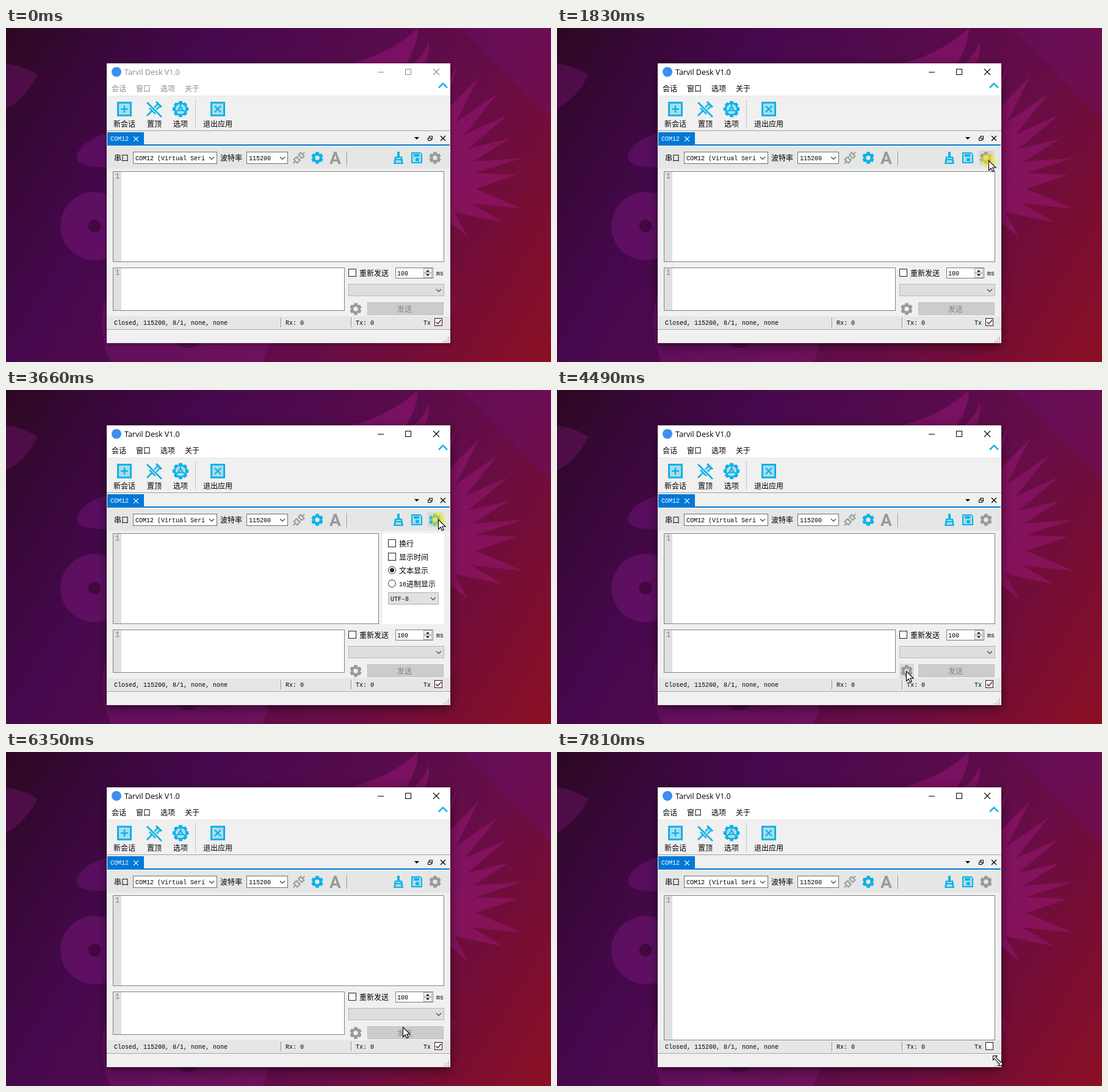
These frames come from a looping animation (893x548 px, 8 s). An HTML page with a canvas:

```html
<!DOCTYPE html>
<html lang="zh">
<head>
<meta charset="utf-8">
<title>Serial session</title>
<style>
html, body { margin: 0; width: 100%; height: 100%; overflow: hidden; background: #44094a; }
canvas { display: block; width: 893px; height: 548px; }
</style>
</head>
<body>
<canvas id="stage" width="893" height="548"></canvas>
<script>
const c = document.getElementById('stage').getContext('2d');
const LOOP = 8000;
const BLUE = '#0bb2e8', PALE = '#a9dcea', GRAY = '#999', FACE = '#f0f0f0', BAR = '#e4e7e6';
const CJK = '12px "Noto Sans CJK SC", "Noto Sans CJK JP", sans-serif';
const MONO = '10px "Liberation Mono", "DejaVu Sans Mono", monospace';

// start, end, steps, x, y, ease power
const MOVES = [
  [260, 530, 5, 842, 409, 1],
  [730, 1500, 12, 709, 221, 1.25],
  [1560, 1630, 2, 707, 217, 1],
  [2160, 2510, 6, 708, 268, 0.613],
  [2580, 2930, 6, 708, 212, 1.3],
  [3930, 4350, 7, 573, 464, 1.2],
  [4490, 4630, 3, 571, 454, 1],
  [5320, 5330, 1, 570, 460, 1],
  [5390, 5530, 3, 538, 457, 1],
  [5600, 5800, 4, 575, 447, 1.2],
  [6080, 6350, 5, 650, 451, 1],
  [6420, 6700, 5, 728, 461, 1.2],
  [6770, 7190, 7, 708, 484, 1.4],
  [7600, 7810, 4, 722, 506, 1.2]
];
const CLICKS = [[1830, 1960], [3660, 3730], [4770, 4900], [5940, 6010], [7390, 7460]];
const within = (t, a, b) => t >= a && t < b;

function pointer(t) {
  let x = 862, y = 533;
  for (const [a, b, n, tx, ty, e] of MOVES) {
    if (t < a) break;
    const k = Math.floor(Math.min(1, (t - a) / (b - a)) * (n - 1)) + 1;
    const p = 1 - Math.pow(1 - k / n, e);
    x += (tx - x) * p;
    y += (ty - y) * p;
  }
  return { x: Math.round(x), y: Math.round(y) };
}

function rect(x, y, w, h, fill) {
  c.fillStyle = fill;
  c.fillRect(x, y, w, h);
}
function box(x, y, w, h, fill, edge) {
  rect(x, y, w, h, edge);
  rect(x + 1, y + 1, w - 2, h - 2, fill);
}
function line(pts, color, width = 1) {
  c.beginPath();
  for (let i = 0; i < pts.length; i += 2) c.lineTo(pts[i], pts[i + 1]);
  c.strokeStyle = color;
  c.lineWidth = width;
  c.stroke();
}
function poly(pts, fill) {
  c.beginPath();
  for (let i = 0; i < pts.length; i += 2) c.lineTo(pts[i], pts[i + 1]);
  c.closePath();
  c.fillStyle = fill;
  c.fill();
}
function disc(x, y, r, fill) {
  c.beginPath();
  c.arc(x, y, r, 0, 7);
  c.fillStyle = fill;
  c.fill();
}
function curve(d, fill) {
  c.fillStyle = fill;
  c.fill(new Path2D(d));
}
function text(s, x, y, font, color = '#000', drop = 4) {
  c.font = font;
  c.fillStyle = color;
  c.fillText(s, x, y + drop);
}
const han = (s, x, y, color) => text(s, x, y, CJK, color, 4.5);
const mono = (s, x, y, color) => text(s, x, y, MONO, color, 3.5);
const cross = (x, y, r, color, w = 1.1) => {
  line([x - r, y - r, x + r, y + r], color, w);
  line([x - r, y + r, x + r, y - r], color, w);
};
const chevron = (x, y, color = '#444') => line([x - 4, y - 2, x, y + 2, x + 4, y - 2], color, 1.2);

function gear(x, y, color, n = 6, r = 10, inner = 7.6, hole = 3.7) {
  c.beginPath();
  for (let i = 0; i < n; i++) {
    const a = i * 2 * Math.PI / n - Math.PI / 2, w = Math.PI / n;
    for (const [d, q] of [[-0.85, inner], [-0.48, r], [0.48, r], [0.85, inner]])
      c.lineTo(x + q * Math.cos(a + d * w), y + q * Math.sin(a + d * w));
  }
  c.closePath();
  c.moveTo(x + hole, y);
  c.arc(x, y, hole, 0, 2 * Math.PI);
  c.fillStyle = color;
  c.fill('evenodd');
}
function check(x, y, on, edge = '#222') {
  box(x, y, 13, 13, '#fff', edge);
  if (on) line([x + 2.5, y + 6.5, x + 5.5, y + 9.5, x + 11, y + 3], '#4a1235', 1.3);
}
function radio(x, y, on) {
  disc(x, y, 6.5, '#333');
  disc(x, y, 5.5, '#fff');
  if (on) disc(x, y, 3.5, '#222');
}
function combo(x, y, w, label, fill = '#fff', edge = '#707070') {
  box(x, y, w, 20, fill, edge);
  mono(label, x + 4, y + 10);
  chevron(x + w - 9, y + 10.5);
}

function wallpaper() {
  const g = c.createLinearGradient(0, 0, 893, 548);
  [[0, '#2c0821'], [0.14, '#39083a'], [0.28, '#46084d'], [0.5, '#560b4c'],
   [0.7, '#680d46'], [0.85, '#780d32'], [1, '#8c1024']].forEach(s => g.addColorStop(...s));
  rect(0, 0, 893, 548, g);
  poly([745, 0, 893, 0, 893, 150], 'rgba(110,18,115,.3)');
  curve('M0 58Q28 62 52 77Q30 118 0 132Z', 'rgba(120,22,115,.4)');
  curve('M165 173C130 182 112 204 117 216C122 227 145 228 165 229Z', 'rgba(125,20,135,.4)');
  disc(145, 325, 56, 'rgba(130,26,130,.42)');
  disc(145, 325, 10.5, '#42083f');
  disc(296, 485, 139, 'rgba(130,26,120,.36)');
  disc(298, 500, 25, '#4a0b48');
  const pink = 'rgba(165,25,130,.42)';
  curve('M565 58Q630 42 675 0Q676 24 656 58Z', pink);
  curve('M668 58Q690 38 692 20Q696 40 686 58Z', pink);
  const tips = [740, 58, 775, 80, 806, 107, 822, 143, 824, 182, 847, 213, 837, 241, 848, 297, 815, 319, 757, 343];
  const fan = [650, 255];
  for (let i = 0; i < tips.length; i += 2) {
    fan.push(tips[i], tips[i + 1]);
    if (i + 3 < tips.length) {
      const mx = (tips[i] + tips[i + 2]) / 2, my = (tips[i + 1] + tips[i + 3]) / 2;
      fan.push(mx + (650 - mx) * 0.38, my + (255 - my) * 0.38);
    }
  }
  poly(fan, pink);
  poly([728, 428, 737, 445, 728, 474], 'rgba(150,20,90,.4)');
}

function frameAndBars(active) {
  const ink = active ? '#000' : '#8c8c8c';
  c.save();
  c.shadowColor = active ? 'rgba(0,0,0,.55)' : 'rgba(0,0,0,.35)';
  c.shadowBlur = active ? 16 : 8;
  c.shadowOffsetY = active ? 4 : 1;
  rect(165, 58, 563, 459, FACE);
  c.restore();
  rect(165, 58, 563, 53, '#fff');
  disc(181, 72, 8, '#3d8ef0');
  text('Tarvil Desk V1.0', 194, 72, '12.5px "Open Sans", "Noto Sans", sans-serif', ink, 4.7);
  rect(609, 72, 10, 1, ink);
  c.strokeStyle = ink;
  c.lineWidth = 1;
  c.strokeRect(654.5, 67.5, 9, 9);
  cross(705, 72, 5, ink);
  ['会话', '窗口', '选项', '关于'].forEach((s, i) => han(s, 173 + i * 40, 99, ink));
  line([709, 98, 716, 91, 723, 98], '#19b4e8', 2.6);
  rect(165, 111, 563, 1, '#e6e6e6');
}

function toolbar() {
  for (const x of [182, 335]) {
    rect(x, 121, 24, 24, BLUE);
    rect(x + 3, 124, 18, 18, PALE);
  }
  line([188, 133, 200, 133], BLUE, 2.4);
  line([194, 127, 194, 139], BLUE, 2.4);
  cross(347, 133, 5, BLUE, 2.4);
  line([231, 144, 239, 136], BLUE, 2.6);
  line([235, 131, 245, 141], BLUE, 3);
  poly([239, 133, 248, 123, 253, 128, 243, 138], PALE);
  line([239, 134, 249, 124], BLUE, 2);
  line([243, 138, 253, 128], BLUE, 2);
  line([246, 121, 255, 130], BLUE, 3);
  line([231, 122, 255, 146], FACE, 5);
  line([231, 122, 255, 146], BLUE, 2.6);
  gear(286, 133, BLUE, 8, 13.4, 10.8, 8);
  disc(286, 133, 8, PALE);
  for (let i = 0; i < 3; i++) {
    const a = Math.PI * (0.5 + i * 2 / 3);
    line([286, 133, 286 - 9 * Math.cos(a), 133 - 9 * Math.sin(a)], BLUE, 2.4);
  }
  disc(286, 133, 3.6, BLUE);
  disc(286, 133, 1.5, PALE);
  han('新会话', 176, 157);
  han('置顶', 231, 157);
  han('选项', 274, 157);
  han('退出应用', 323, 157);
  rect(310, 117, 1, 47, '#c6c6c6');
  rect(165, 168, 563, 1, '#a0a0a0');

  rect(166, 171, 60, 22, '#0078d7');
  rect(166, 191, 561, 2, '#0078d7');
  mono('COM12', 171, 181, '#fff');
  cross(213, 182, 3.8, '#fff', 1.2);
  poly([669, 179, 677, 179, 673, 183], '#000');
  c.strokeStyle = '#000';
  c.lineWidth = 1;
  c.strokeRect(693.5, 177.5, 5, 5);
  box(691, 180, 6, 5, FACE, '#000');
  cross(716, 181, 4, '#000', 1.3);
}

function sessionBar(p1, hover) {
  rect(166, 195, 561, 36, BAR);
  han('串口', 177, 213);
  combo(208, 203, 138, 'COM12 (Virtual Seri');
  han('波特率', 351, 213);
  combo(394, 203, 68, '115200');
  c.save();
  c.translate(480, 213);
  c.rotate(-Math.PI / 4);
  line([-13, 0, -8, 0], GRAY, 2);
  line([8, 0, 13, 0], GRAY, 2);
  c.strokeRect(-8, -4, 6, 8);
  c.strokeRect(3, -4, 5, 8);
  line([-2, -2.5, 1, -2.5], GRAY, 1.5);
  line([-2, 2.5, 1, 2.5], GRAY, 1.5);
  c.restore();
  gear(510, 213, BLUE);
  text('A', 530, 213, 'bold 28px Roboto, "Liberation Sans", sans-serif', GRAY, 10);
  rect(558, 202, 1, 23, '#888');
  rect(559, 202, 1, 23, '#fff');
  rect(641, 203, 4, 9, BLUE);
  poly([637, 211, 649, 211, 651, 223, 635, 223], BLUE);
  rect(639, 213, 8, 2, PALE);
  poly([639, 217, 647, 217, 648, 221, 638, 221], PALE);
  poly([664, 204, 679, 204, 682, 207, 682, 222, 664, 222], BLUE);
  rect(666, 206, 14, 14, PALE);
  rect(668, 207, 9, 4, BLUE);
  disc(674, 216, 3, BLUE);
  if (hover) rect(691, 201, 25, 24, '#d6d8d7');
  gear(703, 213, p1 ? BLUE : GRAY);
}

function editor(x, y, right, bottom) {
  box(x, y, right - x, bottom - y, '#fff', '#828282');
  rect(x + 1, y + 1, 13, bottom - y - 2, '#e0e0e0');
  text('1', x + 4, y + 8, '12px "Liberation Mono", monospace', '#808080', 4);
}

function options(x, y, withTime, hover) {
  const row = s => { han(s, x + 18, y); };
  check(x, y - 7, false);
  row('换行');
  y += 22;
  if (withTime) {
    check(x, y - 7, false);
    row('显示时间');
    y += 22;
  }
  radio(x + 6.5, y - 0.5, true);
  row('文本显示');
  y += 22;
  radio(x + 6.5, y - 0.5, false);
  mono('16', x + 18, y);
  han('进制显示', x + 30, y);
  combo(x, y + 14, 83, 'UTF-8', hover ? '#e5f1fb' : '#e1e1e1', hover ? '#0078d7' : '#adadad');
}

function sendArea(dy, on, hover) {
  check(561, 395 + dy, false);
  han('重新发送', 579, 402 + dy);
  box(638, 393 + dy, 62, 18, '#fff', '#7a7a7a');
  mono('100', 641, 402 + dy);
  box(684, 394 + dy, 14, 8, FACE, '#b0b0b0');
  box(684, 402 + dy, 14, 8, FACE, '#b0b0b0');
  poly([688, 400 + dy, 694, 400 + dy, 691, 397 + dy], '#000');
  poly([688, 404 + dy, 694, 404 + dy, 691, 407 + dy], '#000');
  mono('ms', 705, 402 + dy);
  combo(561, 420 + dy, 157, '', '#dedede', '#b8b8b8');
  if (hover) rect(561, 449 + dy, 24, 24, '#dadada');
  gear(573, 461 + dy, on ? BLUE : GRAY);
  box(592, 450 + dy, 125, 21, '#ccc', '#bfbfbf');
  han('发送', 641, 461 + dy, '#838383');
}

function statusBar(shown, hover) {
  rect(166, 473, 561, 20, BAR);
  mono('Closed, 115200, 8/1, none, none', 177, 483);
  for (const x of [450, 565]) {
    rect(x, 475, 1, 16, '#888');
    rect(x + 1, 475, 1, 16, '#fff');
  }
  mono('Rx: 0', 458, 483);
  mono('Tx: 0', 573, 483);
  mono('Tx', 684, 483);
  check(702, 476, shown, hover ? '#0078d7' : '#3a1028');
  rect(165, 494, 563, 1, '#a0a0a0');
  for (let i = 0; i < 3; i++)
    for (let j = 0; j <= i; j++) rect(724 - j * 3.5, 507 + i * 3.5, 2, 2, '#b4b4b4');
}

function cursor(x, y, resize) {
  c.save();
  c.translate(x, y);
  let d = 'M.5 .5V16.5L4.2 13L6.6 18.6L9.2 17.5L6.8 12H12Z';
  if (resize) d = 'M-7.5 -7.5H-1L-3.2 -5.2L5.2 3.2L7.5 1V8.5H1L3.2 6L-5.2 -2.8L-7.5 -.5Z';
  const path = new Path2D(d);
  c.fillStyle = '#fff';
  c.fill(path);
  c.strokeStyle = '#000';
  c.lineWidth = 1.1;
  c.stroke(path);
  c.restore();
}

function draw(t) {
  const m = pointer(t);
  const active = t >= 1830;
  const p1 = within(t, 1960, 3730), p2 = within(t, 4900, 6010);
  const shown = t < 7460, dy = p2 ? -15 : 0;
  const over = (x, y, w, h) => active && within(m.x, x, x + w) && within(m.y, y, y + h);

  wallpaper();
  frameAndBars(active);
  toolbar();
  sessionBar(p1, over(691, 201, 25, 24));
  editor(175, 235, p1 ? 611 : 718, shown ? 384 + dy : 473);
  if (p1) {
    rect(617, 235, 101, 149, '#fff');
    options(626, 252, true, false);
  }
  if (shown) {
    editor(175, 393 + dy, p2 ? 448 : 555, 464);
    if (p2) {
      rect(454, 369, 101, 104, '#fff');
      options(463, 386, false, over(463, 444, 83, 20));
    }
    sendArea(dy, p2, over(561, 449 + dy, 24, 24));
  }
  statusBar(shown, over(702, 476, 13, 13));

  if (CLICKS.some(k => within(t, ...k))) disc(m.x, m.y, 11.5, 'rgba(250,235,20,.55)');
  if (t >= 260) cursor(m.x, m.y, m.y > 503 && t > 7600);
}

function tick(now) {
  draw(now % LOOP);
  requestAnimationFrame(tick);
}
draw(0);
requestAnimationFrame(tick);
</script>
</body>
</html>
```
